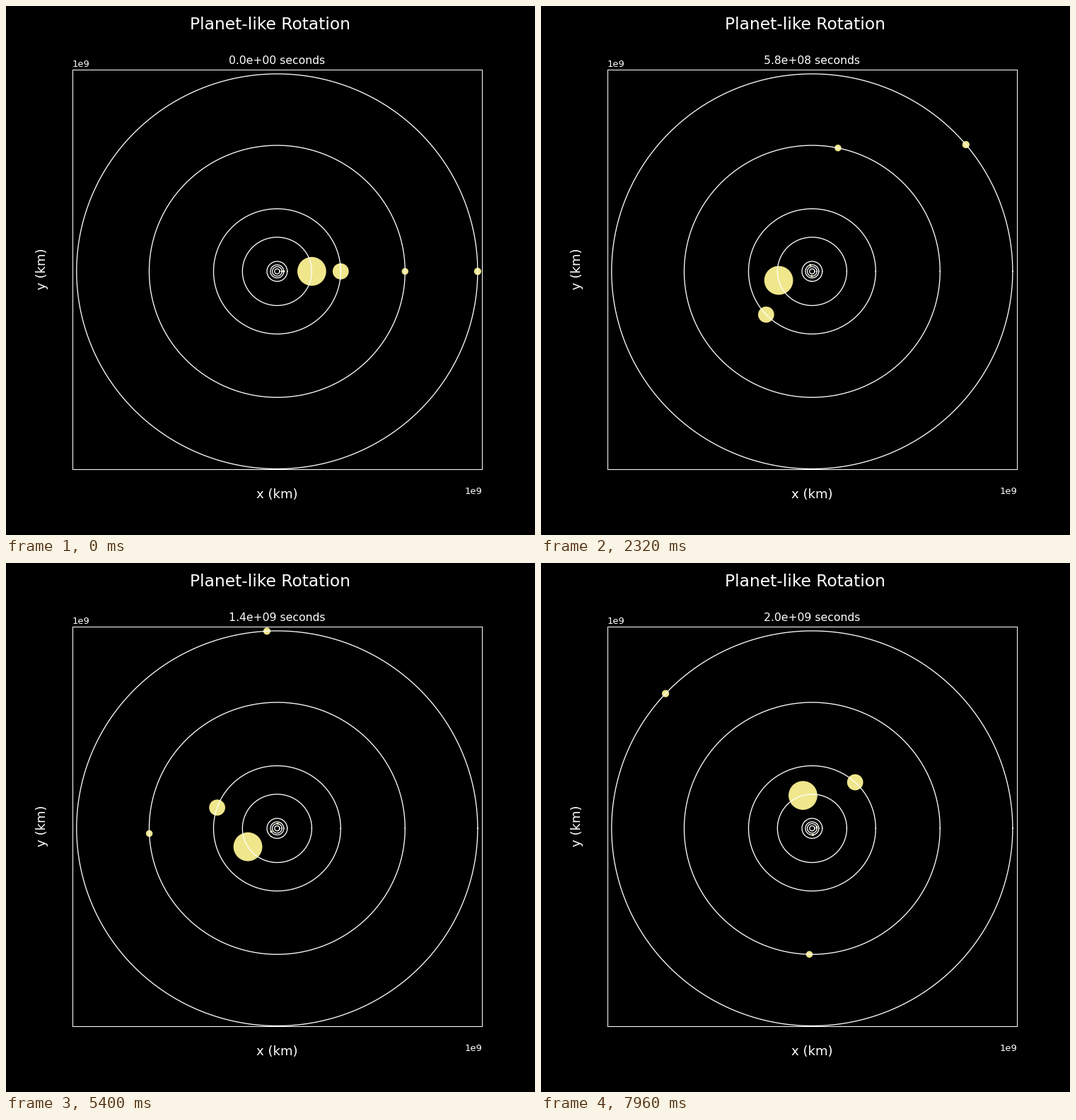
Write a matplotlib script that moves like this. It is 748 by 748 pixels and loops after 8 s.

```python
import numpy as np
import matplotlib.pyplot as plt
from matplotlib.animation import FuncAnimation

plt.rcParams["font.family"] = "DejaVu Sans"

DPI = 93.5
FRAMES = 200
STEP = 1e7            # seconds of orbit time per frame
GM = 1.315e11         # km^3 / s^2

# orbit radius in km and mass in Earth masses, innermost first
radius = np.array([57.9, 108.2, 149.6, 227.9, 778.0, 1426.5, 2871.0, 4500.0]) * 1e6
mass = np.array([0.055, 0.815, 1.0, 0.107, 317.8, 95.2, 14.5, 17.1])
omega = np.sqrt(GM / radius**3)

dot_px = 0.5 + 1.115 * np.sqrt(mass)
dot_area = (2 * dot_px * 72 / DPI) ** 2

fig = plt.figure(figsize=(8, 8), dpi=DPI, facecolor="black")
fig.subplots_adjust(left=0.125, right=0.9, bottom=0.125, top=0.88)
ax = fig.add_subplot(facecolor="black")
ax.set_xlim(-4.6e9, 4.6e9)
ax.set_ylim(-4.5e9, 4.6e9)

fig.suptitle("Planet-like Rotation", fontsize=18, color="white")
ax.set_xlabel("x (km)", fontsize=14, color="white")
ax.set_ylabel("y (km)", fontsize=14, color="white")
title = ax.set_title("", fontsize=12, color="white", y=1.0)

# ticks vanish into the background, only the exponents stay visible
ax.tick_params(colors="black")
for axis in (ax.xaxis, ax.yaxis):
    axis.get_offset_text().set_color("white")
for spine in ax.spines.values():
    spine.set_color("white")

turn = np.linspace(0, 2 * np.pi, 300)
for r in radius:
    ax.plot(r * np.cos(turn), r * np.sin(turn), color="white", lw=1)

planets = ax.scatter(radius, 0 * radius, s=dot_area, color="khaki",
                     linewidths=0, zorder=1)


def update(i):
    t = i * STEP
    angle = omega * t
    planets.set_offsets(np.column_stack((radius * np.cos(angle),
                                         radius * np.sin(angle))))
    title.set_text(f"{t:.1e} seconds")
    return planets, title


anim = FuncAnimation(fig, update, frames=FRAMES, interval=40,
                     repeat=True, repeat_delay=0)
plt.show()
```
